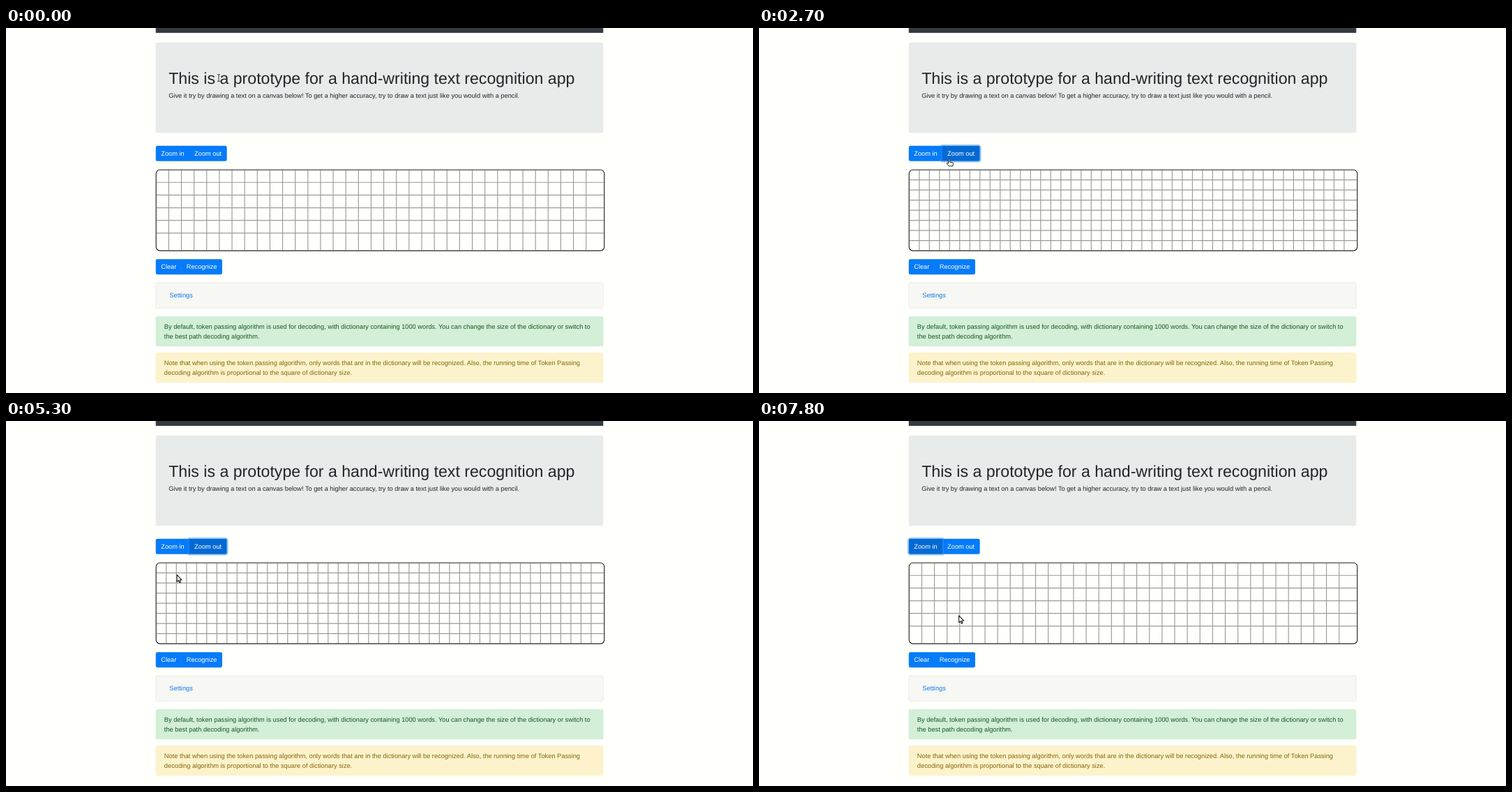
An HTML page that plays this animation: 1071x523 px, repeating every 8000 ms.

```html
<!DOCTYPE html>
<html lang="en">
<head>
<meta charset="utf-8">
<title>Text recognition prototype</title>
<style>
html, body { margin: 0; width: 100%; height: 100%; overflow: hidden; background: #fffffc; }
svg { display: block; width: 1071px; height: 523px; }
text { font: 16px "Liberation Sans", Arial, sans-serif; text-rendering: geometricPrecision; white-space: pre; }
</style>
</head>
<body>
<svg id="stage" viewBox="0 0 1071 523" xmlns="http://www.w3.org/2000/svg"></svg>
<script>
const LOOP = 8000, SCALE = 1071 / 1853;
const LEFT = 371.5, WIDTH = 1110;
const BLUE = '#067bf9', HOVER = '#0569d2', PRESSED = '#0963c0';

const text = (x, y, str, fill, size = 16) =>
  `<text x="${x}" y="${y}" fill="${fill}" style="font-size:${size}px">${str}</text>`;

// Rounded box; rl and rr are the left and right corner radii.
function boxPath(x, y, w, h, rl, rr) {
  return `M${x + rl} ${y}H${x + w - rr}a${rr} ${rr} 0 0 1 ${rr} ${rr}V${y + h - rr}` +
    `a${rr} ${rr} 0 0 1 ${-rr} ${rr}H${x + rl}a${rl} ${rl} 0 0 1 ${-rl} ${-rl}V${y + rl}` +
    `a${rl} ${rl} 0 0 1 ${rl} ${-rl}Z`;
}

const button = (id, x, y, w, rl, rr, label) =>
  `<path id="${id}" d="${boxPath(x, y, w, 38, rl, rr)}" fill="${BLUE}"/>` +
  text(x + 13, y + 24.5, label, '#fff');

const ring = (id, x, y, w, rl, rr) =>
  `<path id="${id}" d="${boxPath(x - 1.6, y - 1.6, w + 3.2, 41.2, rl + 1.6, rr + 1.6)}"
    fill="none" stroke="#268fff" stroke-opacity=".5" stroke-width="3.2"/>`;

const panel = (y, h, fill, border) =>
  `<rect x="${LEFT + .5}" y="${y + .5}" width="${WIDTH - 1}" height="${h - 1}" rx="4" fill="${fill}" stroke="${border}"/>`;

const alertBox = (y, fill, border, ink, lines) =>
  panel(y, 74, fill, border) +
  lines.map((line, i) => text(LEFT + 21, y + 30.5 + i * 24, line, ink)).join('');

const page = `<g transform="scale(${SCALE})">
  <rect x="${LEFT}" y="0" width="${WIDTH}" height="12" fill="#343a3f"/>
  <rect x="${LEFT}" y="36" width="${WIDTH}" height="224" rx="4.8" fill="#e7ebea"/>
  ${text(403.5, 138, 'This is a prototype for a hand-writing text recognition app', '#212529', 40)}
  ${text(403.5, 173.5, 'Give it try by drawing a text on a canvas below! To get a higher accuracy, try to draw a text just like you would with a pencil.', '#212529')}
  ${button('zoomIn', LEFT, 292, 83.8, 4, 0, 'Zoom in')}
  ${button('zoomOut', 454.3, 292, 93.6, 0, 4, 'Zoom out')}
  ${ring('ringIn', LEFT, 292, 83.8, 4, 0)}
  ${ring('ringOut', 454.3, 292, 93.6, 0, 4)}
  <path id="grid" fill="none" stroke="#9b9b9b" stroke-width="2"/>
  <rect x="372.3" y="351.7" width="1111.8" height="200.4" rx="9.5" fill="none" stroke="#222" stroke-width="2"/>
  ${button('clear', LEFT, 573, 64.2, 4, 0, 'Clear')}
  ${button('recognize', 434.7, 573, 101.6, 0, 4, 'Recognize')}
  ${panel(631, 64, '#f7f7f4', '#dfdfdc')}
  ${text(405.5, 668.5, 'Settings', '#0b7bec')}
  ${alertBox(715, '#d3efd8', '#c3e6cb', '#155724', [
    'By default, token passing algorithm is used for decoding, with dictionary containing 1000 words. You can change the size of the dictionary or switch to',
    'the best path decoding algorithm.'])}
  ${alertBox(805, '#fcf3cc', '#fbecba', '#856404', [
    'Note that when using the token passing algorithm, only words that are in the dictionary will be recognized. Also, the running time of Token Passing',
    'decoding algorithm is proportional to the square of dictionary size.'])}
</g>`;

const cursors = `
  <g id="beam" fill="none">
    <path id="beamLine" d="M-2 -5Q0 -5 0 -4Q0 -5 2 -5M0 -4V4M-2 5Q0 5 0 4Q0 5 2 5" stroke="#fff" stroke-width="2.4"/>
    <path d="M-2 -5Q0 -5 0 -4Q0 -5 2 -5M0 -4V4M-2 5Q0 5 0 4Q0 5 2 5" stroke="#333" stroke-width="1.1"/>
  </g>
  <path id="arrow" d="M.6 .8V10.8L2.9 8.8L4.4 12.2L6 11.5L4.6 8.2H7.6Z" fill="#fff" stroke="#1c1c1c" stroke-width="1.1" stroke-linejoin="round"/>
  <path id="hand" d="M2.8 1.5Q3.7 .2 4.6 1.5V5L8.6 5.8Q9.8 6.2 9.7 7.6L9.1 10.9H3.6L.8 7.6Q.6 6.2 1.8 6.4L2.8 7.2Z" fill="#fff" stroke="#1c1c1c" stroke-width="1" stroke-linejoin="round"/>`;

document.getElementById('stage').innerHTML = page + cursors;
const $ = id => document.getElementById(id);

function gridPath(cell) {
  const x0 = 372.4, y0 = 351.5, w = 1112, h = 202;
  let d = '';
  for (let i = 1; i < Math.floor(w / cell); i++) d += `M${x0 + i * cell} ${y0 + 1}V551`;
  for (let i = 1; i < Math.floor(h / cell); i++) d += `M${x0 + 1} ${y0 + i * cell}H1483`;
  return d;
}
const CELL = 31.37;
const grids = [CELL, CELL / 1.25, CELL / 1.5625].map(gridPath);

// Each track holds [time, ...values]; a value stays until the next entry.
const pointer = [
  [0, 'beam', 305, 71.5], [400, 'beam', 323, 86], [500, 'beam', 343, 103],
  [700, 'arrow', 354, 132], [800, 'arrow', 368.7, 160.3],
  [1100, 'arrow', 374.5, 171], [1200, 'arrow', 358, 185.5], [1300, 'arrow', 332, 184],
  [1400, 'hand', 304.6, 174.3], [1600, 'hand', 278, 183], [1700, 'hand', 268.7, 187],
  [3600, 'hand', 252, 184.5], [3700, 'hand', 238.7, 182.7],
  [5100, 'arrow', 243, 189], [5300, 'arrow', 244.5, 219.6], [5400, 'arrow', 245, 221.5],
  [5600, 'arrow', 243, 211], [5700, 'arrow', 238, 198],
  [5800, 'hand', 231, 186], [6000, 'hand', 229.8, 184.7],
  [7500, 'arrow', 242, 206], [7600, 'arrow', 257, 235], [7700, 'arrow', 273, 261], [7800, 'arrow', 286, 278]
];
const zoom = [[0, 0], [2700, 1], [4300, 2], [5300, 1], [7000, 0]];
// zoom in fill, its ring, zoom out fill, its ring
const buttons = [
  [0, BLUE, 0, BLUE, 0], [1400, BLUE, 0, HOVER, 0], [2700, BLUE, 0, HOVER, 1],
  [5400, HOVER, .5, HOVER, .5], [5600, HOVER, 1, BLUE, 0],
  [6500, '#0766c9', 1, BLUE, 0], [6700, PRESSED, 1, BLUE, 0], [7000, HOVER, 1, BLUE, 0]
];
const at = (track, t) => track.findLast(entry => entry[0] <= t);

function draw(t) {
  const [, kind, x, y] = at(pointer, t);
  for (const id of ['beam', 'arrow', 'hand']) {
    $(id).setAttribute('visibility', id === kind ? 'visible' : 'hidden');
  }
  $(kind).setAttribute('transform', `translate(${x} ${y})`);
  $('grid').setAttribute('d', grids[at(zoom, t)[1]]);
  const [, inFill, inRing, outFill, outRing] = at(buttons, t);
  $('zoomIn').setAttribute('fill', inFill);
  $('zoomOut').setAttribute('fill', outFill);
  $('ringIn').setAttribute('opacity', inRing);
  $('ringOut').setAttribute('opacity', outRing);
}

let start;
function tick(now) {
  start ??= now;
  draw((now - start) % LOOP);
  requestAnimationFrame(tick);
}
draw(0);
requestAnimationFrame(tick);
</script>
</body>
</html>
```
